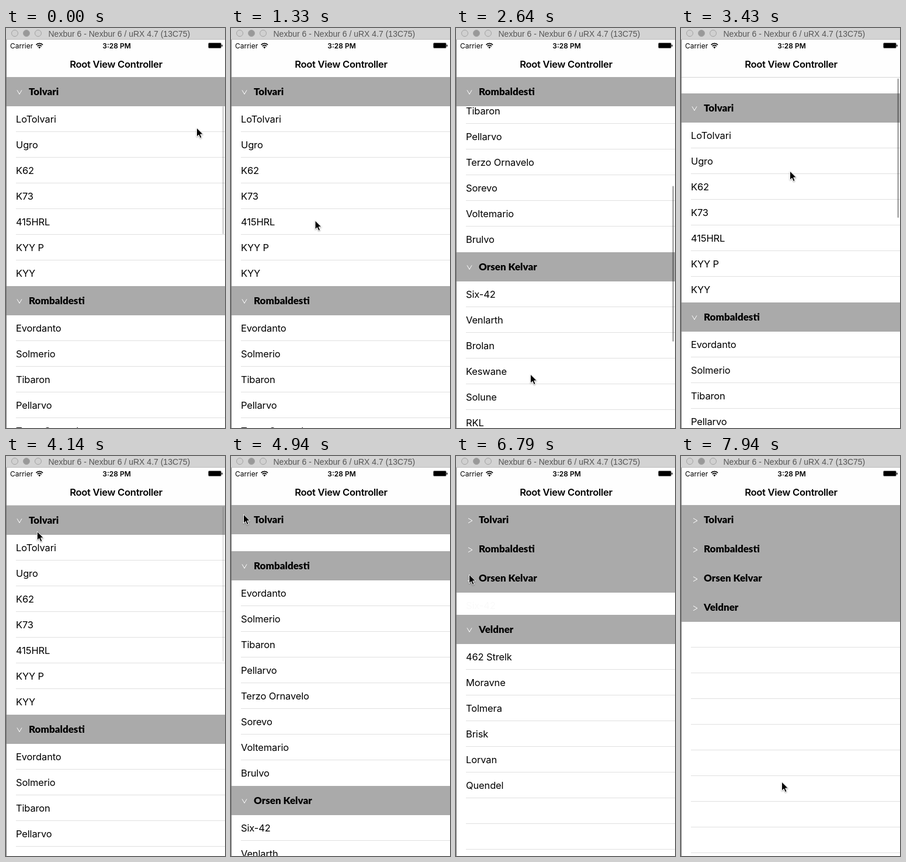
Recreate the animation shown at these times as an HTML page. Size 375x685 px, loop 8000 ms.

```html
<!DOCTYPE html>
<html lang="en">
<head>
<meta charset="utf-8">
<title>Collapsible table</title>
<style>
  html, body { margin: 0; width: 100%; height: 100%; overflow: hidden; background: #fff; }
  svg { display: block; width: 100%; height: 100%; }
  text { white-space: pre; }
  .row { font: 400 16.5px Inter, sans-serif; letter-spacing: -.15px; }
  .head { font: 900 17px Lato, sans-serif; }
  .nav { font: 600 16.6px Inter, sans-serif; letter-spacing: -.3px; }
  .status { font: 400 12px Inter, sans-serif; }
  .window { font: 400 14px "Liberation Sans", Arial, sans-serif; fill: #555; }
  #cursor { filter: drop-shadow(0 1px 1px rgba(0, 0, 0, .35)); }
</style>
</head>
<body>
<svg id="stage" viewBox="0 0 375 685">
  <rect width="375" height="685" fill="#fff"/>
  <g id="rows"></g>
  <rect y="84" width="375" height="1" fill="#d4d4d4"/>
  <g id="heads"></g>
  <rect id="bar" x="370.5" width="2.5" rx="1.25" fill="#000"/>

  <rect y="20" width="375" height="64" fill="#fefefe"/>
  <text class="nav" x="188.5" y="68" text-anchor="middle">Root View Controller</text>
  <text class="status" x="7" y="34.5">Carrier</text>
  <text class="status" x="189.5" y="34.5" text-anchor="middle" style="font-weight:600">3:28 PM</text>
  <g fill="none" stroke="#000" stroke-width="1.7">
    <path d="M51.6 28.8a8 8 0 0 1 11.4 0M53.7 31.2a5 5 0 0 1 7.2 0"/>
    <path d="M57.3 35.2l-2-2.2a3 3 0 0 1 4 0z" fill="#000" stroke="none"/>
  </g>
  <rect x="346.5" y="25.5" width="22" height="9" rx="1.5" fill="none" stroke="#888"/>
  <rect x="347" y="26" width="21" height="8" rx="1"/>
  <rect x="369.2" y="28.5" width="1.4" height="3.4" rx=".7"/>

  <rect width="375" height="20" fill="#d3d3d3"/>
  <rect y="19" width="375" height="1" fill="#bdbdbd"/>
  <g stroke="#a3a3a3">
    <circle cx="15" cy="9" r="5.5" fill="#d0d0d0"/>
    <circle cx="35" cy="9" r="5.5" fill="#999"/>
    <circle cx="55" cy="9" r="5.5" fill="#d0d0d0"/>
  </g>
  <text class="window" x="72.5" y="14.5">Nexbur 6 - Nexbur 6 / uRX 4.7 (13C75)</text>
  <rect y="20" width="1" height="665" fill="#777"/>
  <path id="cursor" d="M.5 1V16.2L4 13 6.5 18.6 9.1 17.5 6.7 12H11.5Z" stroke="#fff" stroke-width="1"/>
</svg>
<script>
const LOOP = 8000, STEP = 1500 / 17;
const TOP = 84, HEAD = 50, ROW = 44;

// shut: when the section starts to collapse
const sections = [
  { name: 'Tolvari', shut: 4698,
    rows: ['LoTolvari', 'Ugro', 'K62', 'K73', '415HRL', 'KYY P', 'KYY'] },
  { name: 'Rombaldesti', shut: 5754,
    rows: ['Evordanto', 'Solmerio', 'Tibaron', 'Pellarvo', 'Terzo Ornavelo', 'Sorevo', 'Voltemario', 'Brulvo'] },
  { name: 'Orsen Kelvar', shut: 6560, shown: 1945,
    rows: ['Six-42', 'Venlarth', 'Brolan', 'Keswane', 'Solune', 'RKL', 'RK24'] },
  { name: 'Veldner', shut: 7450,
    rows: ['462 Strelk', 'Moravne', 'Tolmera', 'Brisk', 'Lorvan', 'Quendel'] }
];

// pointer path: time, x, y
const pointer = [
  [0, 326, 170], [560, 326, 170], [1330, 142, 330], [1560, 142, 330], [1770, 142, 300],
  [2118, 133, 356], [2645, 127, 592], [2910, 127, 592], [3440, 186, 244], [3800, 186, 250],
  [4230, 21, 99], [5240, 21, 99], [5470, 21, 163], [5760, 21, 163], [6000, 22, 189],
  [6350, 22, 202], [6800, 22, 202], [7060, 22, 251], [7470, 22, 251], [7760, 162, 551],
  [7860, 162, 551], [7940, 172, 557], [LOOP, 172, 557]
];

const $ = id => document.getElementById(id);
const unit = (t, from, to) => Math.min(1, Math.max(0, (t - from) / (to - from)));
const mix = (a, b, u) => a + (b - a) * u;
const smooth = u => u * u * (3 - 2 * u);

function add(parent, tag, attrs, text) {
  const el = document.createElementNS('http://www.w3.org/2000/svg', tag);
  for (const key in attrs) el.setAttribute(key, attrs[key]);
  if (text) el.textContent = text;
  return parent.appendChild(el);
}

const place = (el, x, y) => el.setAttribute('transform', `translate(${x} ${y})`);
const line = (parent, i) =>
  add(parent, 'rect', { x: 17, y: HEAD + ROW * (i + 1) - 1, width: 358, height: 1, fill: '#e0e0e0' });

sections.forEach((sec, n) => {
  const last = n === sections.length - 1;
  sec.body = add($('rows'), 'g', {});
  add(sec.body, 'rect', { width: 375, height: 1400, fill: '#fff' });
  sec.cells = add(sec.body, 'g', {});
  sec.rows.forEach((name, i) =>
    add(sec.cells, 'text', { class: 'row', x: 17, y: HEAD + ROW * i + 28 }, name));
  // the last section's lines run on through the empty part of the table
  const lines = last ? 14 : sec.rows.length - 1;
  for (let i = 0; i < lines; i++) line(last ? sec.body : sec.cells, i);

  sec.head = add($('heads'), 'g', {});
  add(sec.head, 'rect', { width: 375, height: HEAD, fill: '#aaa' });
  add(sec.head, 'text', { class: 'head', x: 39, y: 31 }, sec.name);
  sec.arrow = add(sec.head, 'polyline', {
    points: '-3.15,-2.85 3.85,1.15 -3.15,5.15', fill: 'none', stroke: '#fff'
  });
});

function scrollAt(t) {
  const glide = end => 29 + 521.5 * (1 - Math.exp((1770 - end) / 500));
  if (t < 1770) return 29 * unit(t, 1530, 1770) ** 3;
  if (t < 2910) return glide(Math.min(t, 2735));
  if (t < 3440) return mix(glide(2735), -28, smooth(unit(t, 2910, 3440)));
  if (t < 3800) return mix(-28, -34, unit(t, 3440, 3800));
  return -34 * (1 - unit(t, 3800, 4220)) ** 2;
}

function pointerAt(t) {
  const i = Math.max(1, pointer.findIndex(p => p[0] >= t));
  const [a, b] = [pointer[i - 1], pointer[i]];
  const u = unit(t, a[0], b[0]);
  return [mix(a[1], b[1], u), mix(a[2], b[2], u)];
}

function drawBar(t, scroll) {
  const bar = $('bar');
  const top = 86.5 + 0.4 * Math.max(0, scroll);
  const bottom = top + 266.5 + Math.min(0, scroll);
  // starts out behind the first header
  const y = t < STEP / 2 ? TOP + HEAD : top;
  const shown = t < 1530
    ? mix(0.5, 1, unit(t, 0, 170)) * (1 - unit(t, 580, 880))
    : 1 - unit(t, 3950, 4230);
  bar.setAttribute('y', y);
  bar.setAttribute('height', bottom - y);
  bar.setAttribute('opacity', 0.36 * shown);
}

function render(t) {
  const scroll = Math.round(scrollAt(t));
  let y = TOP - scroll;
  for (const sec of sections) {
    const shut = smooth(unit(t, sec.shut, sec.shut + 300));
    const height = HEAD + Math.round(ROW * sec.rows.length * (1 - shut));
    const turn = sec.shown ? smooth(unit(t, sec.shown, sec.shown + 350)) : 1;
    place(sec.body, 0, y);
    sec.cells.setAttribute('opacity', Math.max(0, 1 - 1.12 * shut));
    // sticks to the top until the next header pushes it away
    place(sec.head, 0, Math.max(y, Math.min(TOP, y + height - HEAD)));
    sec.arrow.setAttribute('transform', `translate(24.15 25.55) rotate(${90 * turn * (1 - shut)})`);
    y += height;
  }
  drawBar(t, scroll);
  place($('cursor'), ...pointerAt(t));
}

const start = performance.now();
function tick() {
  const t = (performance.now() - start) % LOOP;
  render(Math.floor((t + 13) / STEP) * STEP);
  requestAnimationFrame(tick);
}
tick();
</script>
</body>
</html>
```
